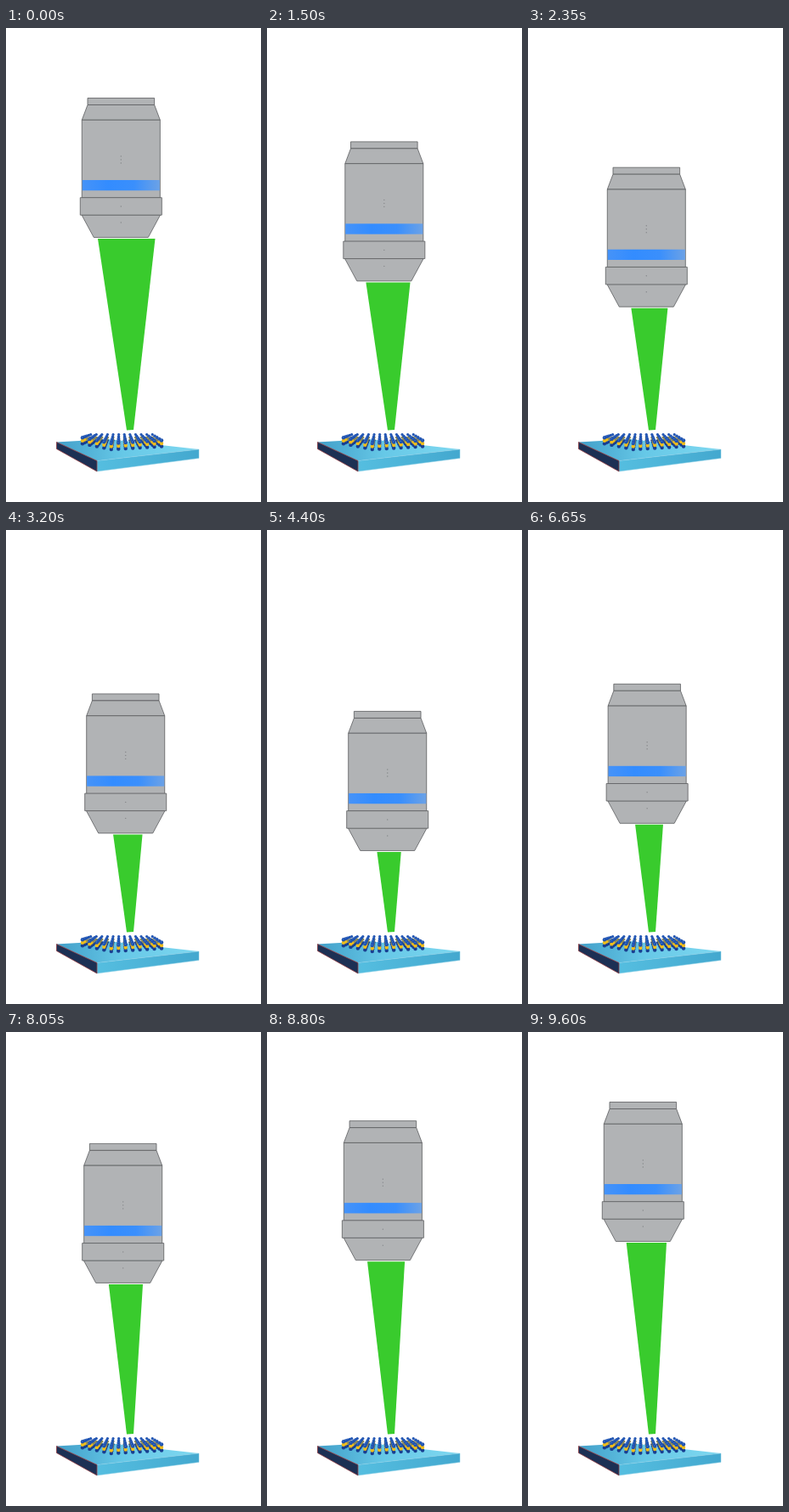
Write an HTML page with a canvas that moves like this. It is 300x558 px and loops after 9.65 s.

```html
<!DOCTYPE html>
<html>
<head>
<meta charset="utf-8">
<style>
html, body { margin: 0; width: 100%; height: 100%; overflow: hidden; background: #fff; }
canvas { display: block; }
</style>
</head>
<body>
<canvas id="stage" width="300" height="558"></canvas>
<script>
const ctx = document.getElementById('stage').getContext('2d');
const LOOP = 9650, STEP = 50, TURN = 4740, DEPTH = 132;

const mix = (a, b, p) => a + (b - a) * p;

function poly(points, fill, stroke, width = 0.8) {
  ctx.beginPath();
  points.forEach(([x, y]) => ctx.lineTo(x, y));
  ctx.closePath();
  ctx.fillStyle = fill;
  ctx.fill();
  if (!stroke) return;
  ctx.strokeStyle = stroke;
  ctx.lineWidth = width;
  ctx.stroke();
}

function dot(x, y, r, fill) {
  ctx.fillStyle = fill;
  ctx.beginPath();
  ctx.arc(x, y, r, 0, 7);
  ctx.fill();
}

function gradient(x0, x1, ...colors) {
  const g = ctx.createLinearGradient(x0, 0, x1, 0);
  colors.forEach((c, i) => g.addColorStop(i / (colors.length - 1), c));
  return g;
}

// Steady travel that brakes and turns around smoothly at TURN
function lensDrop(t) {
  const u = Math.abs(t - TURN) / 1000, brake = 1.96;
  const lift = u < brake ? u * u : brake * (2 * u - brake);
  return Math.max(0, DEPTH - 9.1 * lift);
}

function drawBeam(t, drop) {
  const p = drop / DEPTH, y = 248 + drop, down = t < TURN;
  const left = mix(down ? 108 : 115.7, 129.6, p);
  const right = mix(down ? 175.5 : 163, 157.6, p);
  poly([[left, y], [right, y], [150, 473], [142, 473.5]], '#39cb2d');
}

// Lens section, symmetric about the optical axis at x = 0
function section(top, bottom, topHalf, bottomHalf = topHalf) {
  poly([[-topHalf, top], [topHalf, top], [bottomHalf, bottom], [-bottomHalf, bottom]],
    '#b1b3b5', '#5c5e60');
}

function drawLens(drop) {
  ctx.save();
  ctx.translate(135.3 + drop * 0.049, drop);
  section(82.5, 90.5, 39.3);
  section(90.5, 108.3, 39.3, 46);
  section(108.3, 200, 46);
  ctx.fillStyle = gradient(-46, 46, '#4693f8', '#338cff', '#3a8ffc', '#6ca2e6');
  ctx.fillRect(-45.6, 179, 91.2, 12.3);
  section(220, 246.5, 46.3, 32);
  section(199.7, 220.2, 48);
  for (const y of [151, 155, 159, 210, 229]) dot(0, y, 0.7, '#85878a');
  ctx.restore();
}

function drawSlab() {
  const left = [59.5, 487.5], front = [107, 509.5], right = [227, 496];
  poly([left, [120, 484], right, front], gradient(60, 215, '#429fc9', '#66c8e7', '#7cd6ef'));
  poly([front, right, [227, 506.5], [107, 522]],
    gradient(107, 227, '#55bee0', '#43a8cf'), '#8fd0e6', 0.5);
  poly([left, front, [107, 522], [59.5, 495.5]], '#1c3054', '#8f3b42', 0.8);
}

// Rows of atoms running back from the front edge, converging with distance
function drawCrystal() {
  const cols = 12, rows = 5;
  for (let r = 0; r < rows; r++) {
    const near = r / (rows - 1);
    for (let c = 0; c < cols; c++) {
      const frontX = mix(90, 183, c / (cols - 1));
      const frontY = 492.5 - Math.abs(frontX - 124) * (frontX < 124 ? 0.2 : 0.06);
      const x = mix(mix(134, frontX, 0.78), frontX, near);
      const y = mix(482, frontY, near), size = mix(1.6, 2.2, near);
      dot(x, y + 3.5, size, '#193f91');
      dot(x, y, size, near > 0.5 ? '#efbd1b' : '#8d8a55');
      dot(x, y - 3.5, size, '#1f51ae');
      dot(x - 0.5, y - 4, size / 3, '#3c78d4');
    }
  }
}

function frame(now) {
  const t = Math.floor(now % LOOP / STEP) * STEP;
  const drop = lensDrop(t);
  ctx.fillStyle = '#fff';
  ctx.fillRect(0, 0, 300, 558);
  drawSlab();
  drawCrystal();
  drawBeam(t, drop);
  drawLens(drop);
  requestAnimationFrame(frame);
}

frame(0);
</script>
</body>
</html>
```
